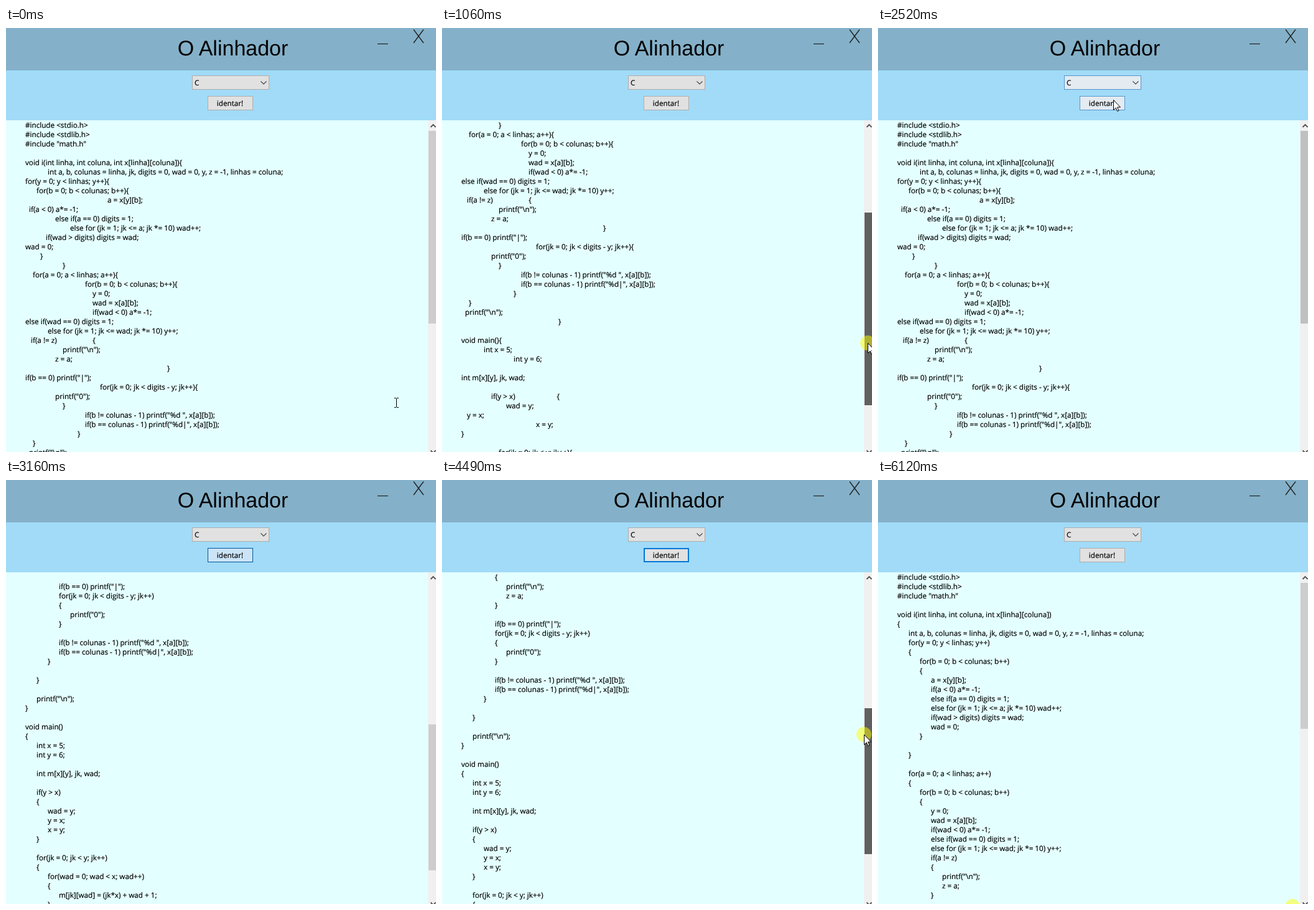
An HTML page with a canvas for the animation above (6260 ms loop, 691 px wide and 680 px high).

```html
<!DOCTYPE html>
<html lang="pt">
<head>
<meta charset="utf-8">
<title>O Alinhador</title>
<style>
html, body { margin: 0; width: 100%; height: 100%; overflow: hidden; }
canvas { display: block; }
</style>
</head>
<body>
<canvas id="stage" width="691" height="680"></canvas>
<script>
const ctx = document.getElementById('stage').getContext('2d', { alpha: false });
const LOOP = 6260, LINE = 15, TRACK_TOP = 165, BAR_X = 679;
const UI_FONT = '11.7px "Open Sans", "Noto Sans", sans-serif';
const IDLE = '#cdcdcd', HOVER = '#a6a6a6', PRESSED = '#606060';

// Each line may begin with its indent in spaces, then a bar.
const messy = String.raw`#include <stdio.h>
#include <stdlib.h>
#include "math.h"

void i(int linha, int coluna, int x[linha][coluna]){
12|int a, b, colunas = linha, jk, digits = 0, wad = 0, y, z = -1, linhas = coluna;
for(y = 0; y < linhas; y++){
6|for(b = 0; b < colunas; b++){
44|a = x[y][b];
2|if(a < 0) a*= -1;
16|else if(a == 0) digits = 1;
24|else for (jk = 1; jk <= a; jk *= 10) wad++;
11|if(wad > digits) digits = wad;
wad = 0;
8|}
20|}
4|for(a = 0; a < linhas; a++){
32|for(b = 0; b < colunas; b++){
36|y = 0;
36|wad = x[a][b];
36|if(wad < 0) a*= -1;
else if(wad == 0) digits = 1;
12|else for (jk = 1; jk <= wad; jk *= 10) y++;
3|if(a != z)                   {
20|printf("\n");
16|z = a;
76|}
if(b == 0) printf("|");
40|for(jk = 0; jk < digits - y; jk++){
16|printf("0");
20|}
32|if(b != colunas - 1) printf("%d ", x[a][b]);
32|if(b == colunas - 1) printf("%d|", x[a][b]);
28|}
4|}
2|printf("\n");
52|}

void main(){
12|int x = 5;
28|int y = 6;

int m[x][y], jk, wad;

16|if(y > x)                      {
24|wad = y;
3|y = x;
40|x = y;
}

20|for(jk = 0; jk < y; jk++){
12|for(wad = 0; wad < x; wad++){
28|m[jk][wad] = (jk*x) + wad + 1;
8|}
16|}
4|i(x, y, m);
}
`.split('\n').map(line => {
  const [, indent = 0, text] = line.match(/^(?:(\d+)\|)?(.*)$/);
  return { indent: +indent, text };
});

// Braces get their own lines, and a blank line follows each closing brace.
function tidy(lines) {
  const out = [];
  let depth = 0;
  const add = text => {
    if (!text && !out[out.length - 1].text) return;
    if (text === '}') depth--;
    out.push({ indent: depth * 6, text });
    if (text === '{') depth++;
    if (text === '}') add('');
  };
  for (const { text } of lines) {
    if (text.endsWith('{')) {
      add(text.slice(0, -1).trim());
      add('{');
    } else add(text);
  }
  return out;
}

const documents = {
  messy: { lines: messy, thumb: 309, pitch: 8.7 },
  tidy: { lines: tidy(messy), thumb: 234, pitch: 6.49 }
};

const buttonLooks = {
  idle: ['#e1e1e1', '#adadad', 1],
  warm: ['#e4ebf1', '#5596cc', 1],
  hot: ['#e5f1fb', '#0078d7', 1],
  down: ['#cce4f7', '#005499', 1],
  focus: ['#e1e1e1', '#0078d7', 2]
};

const approach = [[655, 470], [681, 400], [680, 374]];
const toButton = [[650, 300], [520, 165], [415, 92], [378, 115], [372, 118], [370, 119]];
const toThumb = [[643, 371], [652, 385], [664, 415], [674, 445], [680, 470], [679, 479]];
const leave = [[682, 215], [670, 290], [660, 400], [652, 520], [646, 620], [644, 667]];

function stepAt(t, start, end, count = 6) {
  const k = Math.floor((t - start) / (end - start) * (count - 1) + 0.2);
  return t < start ? -1 : Math.min(k, count - 1);
}
const remaining = step => (1 - (step + 1) / 6) ** 1.58;
const thumbTop = s => TRACK_TOP + Math.round(s.scroll * s.doc.pitch);

function stateAt(t) {
  const s = {
    doc: t < 2850 ? documents.messy : documents.tidy,
    scroll: 0, pos: null, held: false, thumb: IDLE, button: 'idle', combo: 'idle'
  };
  const drag = (x, grip) => {
    s.held = true;
    s.thumb = PRESSED;
    s.pos = [x, thumbTop(s) + grip];
  };
  if (t >= 3500 && t < 6120) s.button = 'focus';

  if (t < 740) {
    const k = stepAt(t, 100, 300, 3);
    s.pos = approach[k] || [627, 601];
    s.held = k === 2;
    s.thumb = [IDLE, IDLE, HOVER, PRESSED][k + 1];
  } else if (t < 1520) {
    const u = (stepAt(t, 740, 1300) + 1) / 6;
    s.scroll = Math.round(22 * u);
    drag(680 + 6 * u, 209);
  } else if (t < 2170) {
    s.scroll = Math.round(22 * remaining(stepAt(t, 1520, 2060)));
    drag(669, 209);
  } else if (t < 2850) {
    const k = stepAt(t, 2170, 2730);
    s.pos = toButton[k];
    s.thumb = [HOVER, '#b0b0b0', '#b8b8b8', '#c0c0c0', IDLE, IDLE][k];
    s.combo = k === 2 ? 'hot' : k === 3 ? 'warm' : 'idle';
    s.button = k < 3 ? 'idle' : k === 3 ? 'warm' : 'hot';
  } else if (t < 3730) {
    const k = stepAt(t, 2850, 3380);
    s.scroll = Math.round(42 * (1 - remaining(k)));
    if (k === 0) s.pos = toButton[5];
    if (t < 3500) s.button = 'down';
  } else if (t < 4490) {
    const k = stepAt(t, 3730, 4270);
    s.scroll = 42;
    s.pos = toThumb[k];
    s.held = k === 5;
    s.thumb = k === 5 ? PRESSED : k === 4 ? HOVER : IDLE;
  } else if (t < 5370) {
    s.scroll = Math.round(42 * remaining(stepAt(t, 4490, 5050)));
    drag(678, 42);
  } else if (t < 6120) {
    const k = stepAt(t, 5370, 5910);
    s.pos = leave[k];
    if (k === 0) s.thumb = HOVER;
  } else {
    s.pos = [666, 684];
    s.held = true;
  }
  return s;
}

function rect(color, x, y, w, h) {
  ctx.fillStyle = color;
  ctx.fillRect(x, y, w, h);
}

function text(string, x, y, font = UI_FONT, align = 'left') {
  ctx.font = font;
  ctx.textAlign = align;
  ctx.fillStyle = ctx.strokeStyle = '#000';
  ctx.fillText(string, x, y);
  // A hairline outline gives the small type crisp, dark stems.
  if (font === UI_FONT) {
    ctx.lineWidth = 0.2;
    ctx.strokeText(string, x, y);
  }
}

function stroke(path, color, width) {
  ctx.strokeStyle = color;
  ctx.lineWidth = width;
  ctx.stroke(new Path2D(path));
}

function box(look, x, y, w, h) {
  const [fill, border, width] = buttonLooks[look];
  rect(border, x, y, w, h);
  rect(fill, x + width, y + width, w - 2 * width, h - 2 * width);
}

function drawHeader(s) {
  rect('#84b1c9', 0, 0, 691, 68);
  rect('#a1dbf8', 0, 68, 691, 80);
  text('O Alinhador', 364.5, 44, '34px "Liberation Sans", Arial, sans-serif', 'center');
  stroke('M597 25.5H614', '#222', 1.2);
  stroke('M655 2.5L671 24M671 2.5L655 24', '#222', 1.4);
  box(s.combo, 299, 76, 124, 23);
  text('C', 303, 92);
  stroke('M409.5 85.5L414 90L418.5 85.5', '#444', 1.2);
  box(s.button, 324, 109, 73, 23);
  text('identar!', 360, 125, UI_FONT, 'center');
}

function drawEditor(s) {
  rect('#e4ffff', 0, 148, 691, 532);
  s.doc.lines.slice(s.scroll, s.scroll + 36).forEach((line, row) =>
    text(line.text, 31 + 3 * line.indent, 160 + LINE * row));
  rect('#f0f0f0', BAR_X - 1, 148, 13, 532);
  rect(s.thumb, BAR_X, thumbTop(s), 12, s.doc.thumb);
  stroke('M682.5 159L686.5 155L690.5 159M682.5 677.5L686.5 681.5L690.5 677.5', '#505050', 1.8);
}

function drawCursor({ pos, held }) {
  if (!pos) return;
  const [x, y] = pos;
  ctx.save();
  ctx.translate(x, y);
  if (held) {
    ctx.fillStyle = 'rgba(255,255,0,.5)';
    ctx.beginPath();
    ctx.arc(0, 0, 12, 0, 2 * Math.PI);
    ctx.fill();
  }
  if (held || x >= BAR_X || y < 148) {
    const arrow = 'M.5 .5V16.5L4.2 13L6.7 18.5L9 17.5L6.6 12H11.5Z';
    ctx.fillStyle = '#fff';
    ctx.fill(new Path2D(arrow));
    stroke(arrow, '#000', 1);
  } else {
    stroke('M-3 -7.5H0M1 -7.5H4M.5 -7V7M-3 7.5H0M1 7.5H4', '#000', 1);
  }
  ctx.restore();
}

function frame() {
  const s = stateAt(performance.now() % LOOP);
  ctx.textRendering = 'geometricPrecision';
  drawEditor(s);
  drawHeader(s);
  drawCursor(s);
  requestAnimationFrame(frame);
}
frame();
</script>
</body>
</html>
```
